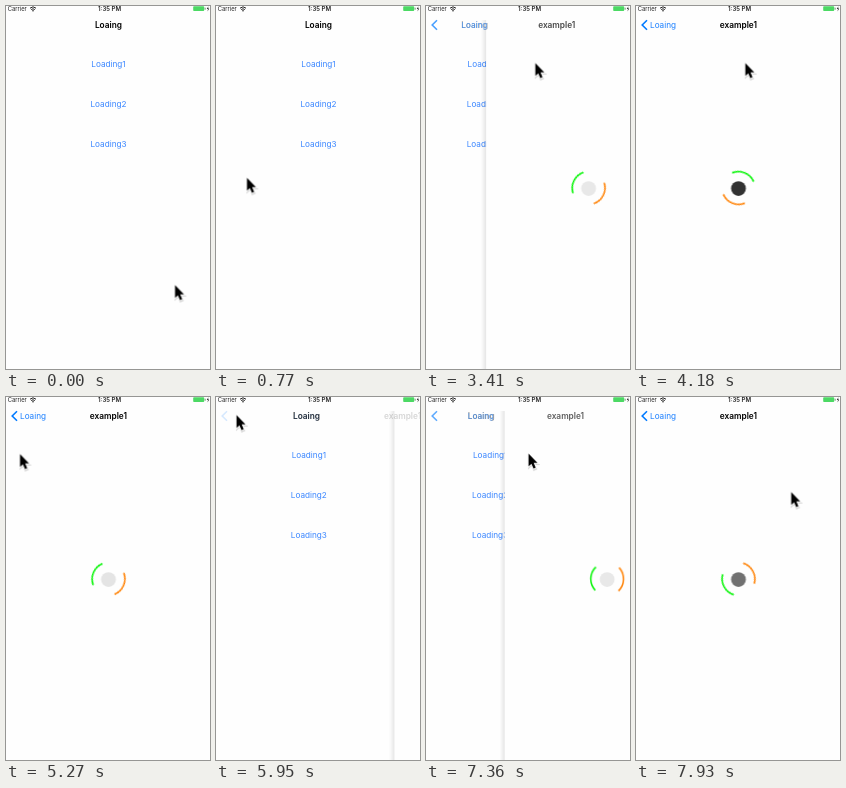
An HTML page for the animation above (7.99 s loop, 204x363 px).

```html
<!DOCTYPE html>
<html lang="en">
<head>
<meta charset="utf-8">
<title>Loading</title>
<style>
html, body { margin: 0; width: 100%; height: 100%; overflow: hidden; background: #fefefe; }
svg { display: block; width: 100vw; height: 100vh; font-family: Inter, Roboto, "Liberation Sans", sans-serif; }

.status { font-size: 5.8px; fill: #222; }
.time { font-size: 6.1px; font-weight: 600; }
.title { font-size: 8.3px; font-weight: 600; fill: #000; }
.link { font-size: 8.2px; fill: #3a86ff; }
.back { fill: #1a7fff; }
.mid { text-anchor: middle; }
.paper { fill: #fefefe; }

.anim { animation: 7990ms linear infinite; }
.list { animation-name: list; }
.detail { animation-name: detail; }
.home { animation-name: home; }
.back { animation-name: back; }
.chevron { animation-name: chevron; }
.name { animation-name: name; }
.spin { animation-name: spin; }
.pulse { animation-name: pulse; }
.cursor { animation-name: cursor; }
/* every navigation move shares one curve */
.list, .detail, .home, .back, .chevron, .name { animation-timing-function: cubic-bezier(.25, .3, .25, 1); }

/* push 40.3-46.56, pop 71.34-77.6, push 90.11-96.37 */
@keyframes list {
  0%, 40.3%, 77.6%, 90.11% { transform: translateX(0); }
  46.56%, 71.34%, 96.37%, 100% { transform: translateX(-61px); }
}
@keyframes detail {
  0%, 40.3%, 77.6%, 90.11% { transform: translateX(212px); }
  46.56%, 71.34%, 96.37%, 100% { transform: translateX(0); }
}
@keyframes home {
  0%, 40.3%, 77.6%, 90.11% { transform: translateX(0); opacity: 1; }
  46.56%, 71.34%, 96.37%, 100% { transform: translateX(-75px); opacity: 0; }
}
@keyframes back {
  0%, 40.3%, 77.6%, 90.11% { transform: translateX(75px); opacity: 0; }
  46.56%, 71.34%, 96.37%, 100% { transform: translateX(0); opacity: 1; }
}
@keyframes chevron {
  0%, 40.3%, 77.6%, 90.11% { opacity: 0; }
  46.56%, 71.34%, 96.37%, 100% { opacity: 1; }
}
@keyframes name {
  0%, 40.3%, 77.6%, 90.11% { transform: translateX(100px); opacity: 0; }
  46.56%, 71.34%, 96.37%, 100% { transform: translateX(0); opacity: 1; }
}
@keyframes spin {
  0%, 40.3% { transform: rotate(-264deg); }
  81.1% { transform: rotate(1623deg); }
  81.11%, 90.11% { transform: rotate(-271.7deg); }
  100% { transform: rotate(185.7deg); }
}
@keyframes pulse {
  0%, 42.3%, 67.33% { opacity: .1; animation-timing-function: ease-in-out; }
  54.82%, 79.85% { opacity: 1; animation-timing-function: ease-in-out; }
  81.1%, 92.37% { opacity: .1; animation-timing-function: linear; }
  100% { opacity: .7; }
}
@keyframes cursor {
  0%, .9% { transform: translate(168.5px, 278.5px); animation-timing-function: ease-out; }
  3.75%, 6.2% { transform: translate(44.5px, 258.5px); }
  9.64% { transform: translate(30.5px, 171.5px); }
  10.4% { transform: translate(26.5px, 150px); }
  12.5% { transform: translate(90px, 92px); }
  13.9% { transform: translate(143.5px, 67px); }
  15.4%, 17.8% { transform: translate(122.5px, 57.5px); animation-timing-function: ease-out; }
  21.28%, 28.9% { transform: translate(108.8px, 56.5px); }
  30.9%, 32.6% { transform: translate(108.1px, 55px); }
  33.79%, 52.5% { transform: translate(108.8px, 56.5px); animation-timing-function: ease-in-out; }
  55.6% { transform: translate(143.5px, 55px); animation-timing-function: ease-in; }
  60.2% { transform: translate(60px, 50px); animation-timing-function: ease-out; }
  64.5%, 66.3% { transform: translate(13.5px, 56.5px); animation-timing-function: ease-in-out; }
  70.1%, 77.2% { transform: translate(20px, 17.5px); animation-timing-function: ease-in-out; }
  82.4%, 83% { transform: translate(96px, 52.5px); animation-timing-function: ease-in-out; }
  84.5%, 92.4% { transform: translate(102px, 56px); animation-timing-function: ease-in-out; }
  99%, 100% { transform: translate(154.7px, 94.5px); }
}
</style>
</head>
<body>
<svg viewBox="0 0 204 363">
  <rect class="paper" width="204" height="363"/>

  <g class="anim list">
    <rect class="paper" width="204" height="363"/>
    <g class="link mid">
      <text x="102.5" y="60.5">Loading1</text>
      <text x="102.5" y="100.5">Loading2</text>
      <text x="102.5" y="140.5">Loading3</text>
    </g>
  </g>

  <g class="anim detail">
    <linearGradient id="edge">
      <stop offset="0" stop-opacity="0"/>
      <stop offset="1" stop-opacity=".1"/>
    </linearGradient>
    <rect x="-5" y="14" width="5" height="349" fill="url(#edge)"/>
    <rect class="paper" width="204" height="363"/>
    <g transform="translate(102.5 182)">
      <g class="anim spin" fill="none" stroke-width="1.6">
        <path d="M11.6 -11.6A16.4 16.4 0 0 1 11.6 11.6" stroke="#0cf50c"/>
        <path d="M-11.6 11.6A16.4 16.4 0 0 1 -11.6 -11.6" stroke="#ff860d"/>
      </g>
      <circle class="anim pulse" cy=".6" r="7.4" fill="#222"/>
    </g>
  </g>

  <g class="mid title">
    <text class="anim home" x="102.4" y="22">Loaing</text>
    <text class="anim name" x="102.4" y="22">example1</text>
  </g>
  <path class="anim chevron" d="M11 14.2L6.2 19L11 23.8" fill="none" stroke="#007aff" stroke-width="1.6"/>
  <text class="link anim back" x="14" y="22">Loaing</text>

  <g class="status">
    <rect class="paper" width="204" height="8"/>
    <text x="1.8" y="5.2">Carrier</text>
    <text class="time mid" x="103.5" y="5.3">1:35 PM</text>
    <path d="M24 2.2Q27 -.6 30 2.2M25.2 3.6Q27 1.9 28.8 3.6" fill="none" stroke="#222"/>
    <circle cx="27" cy="4.7" r=".8"/>
    <rect x="187.2" y=".2" width="11" height="4.9" rx=".8" fill="#4cd964"/>
    <rect x="198.7" y="1.7" width=".8" height="2" fill="#4c7a55"/>
    <path d="M202.4 .2L200.8 3.1H202L201.5 5.4L203.2 2.4H202.1Z"/>
  </g>

  <g class="anim cursor">
    <g transform="translate(.5 .7) scale(.9)">
      <path d="M.4 1.5V15.5L3.6 12.6L6 18L8.6 16.8L6.3 11.6H10.6Z" opacity=".16" stroke="#000" stroke-width="2"/>
      <path d="M0 0V14L3.2 11.2L5.6 16.5L8 15.5L5.7 10.2H10Z" stroke="#fff" stroke-width="2" paint-order="stroke"/>
    </g>
  </g>
</svg>
</body>
</html>
```
